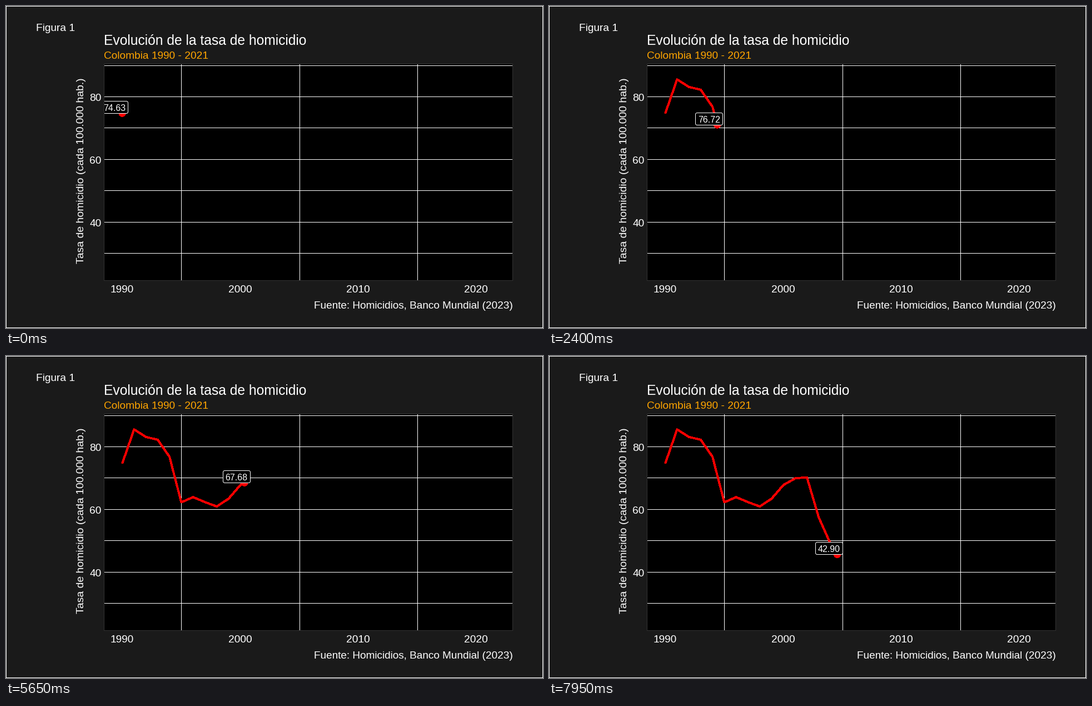
Animation, 966 px wide and 580 px high, one loop 8 s. Source, as a matplotlib script:

```python
import numpy as np
import matplotlib.pyplot as plt
from matplotlib.animation import FuncAnimation
from matplotlib.patches import Circle, FancyBboxPatch, Rectangle

W, H, DPI = 966, 580, 100
FRAMES, STEP_MS = 160, 50
YEARS_PER_FRAME = 0.0916
PT = 72 / DPI  # points per pixel

RATES = np.array([74.63, 85.45, 83.05, 82.16, 76.72, 62.17, 63.83, 62.25,
                  60.85, 63.30, 67.68, 69.82, 70.17, 57.38, 48.90, 42.90])
YEARS = np.arange(len(RATES))  # years since 1990

LEFT, TOP, RIGHT, BOTTOM = 176, 104, 912, 495


def x_px(year):
    return 209.2 + 21.23 * year


def y_px(rate):
    return 106.6 + 5.64 * (90 - rate)


plt.rcParams["font.family"] = "Liberation Sans"
fig = plt.figure(figsize=(W / DPI, H / DPI), dpi=DPI, facecolor="#1a1a1a")
ax = fig.add_axes([0, 0, 1, 1])
ax.set_xlim(0, W)
ax.set_ylim(H, 0)
ax.axis("off")


def fill(x0, y0, x1, y1, color, zorder=1):
    return ax.add_patch(Rectangle((x0, y0), x1 - x0, y1 - y0, fc=color,
                                  ec="none", lw=0, zorder=zorder))


def outline(x0, y0, x1, y1, color, zorder=1):
    """One-pixel border just inside the given box."""
    for side in ((x0, y0, x1, y0 + 1), (x0, y1 - 1, x1, y1),
                 (x0, y0, x0 + 1, y1), (x1 - 1, y0, x1, y1)):
        fill(*side, color, zorder)


def write(x, y, text, size=19.1, color="white", ha="left", **style):
    return ax.text(x, y, text, fontsize=size * PT, color=color, ha=ha,
                   va="baseline", **style)


# Panel, grid and frame
outline(0, 0, W, H, "white")
panel = fill(LEFT, TOP, RIGHT, BOTTOM, "black")
for rate in range(30, 91, 10):
    row = np.round(y_px(rate))
    fill(LEFT, row, RIGHT, row + 1, "white", zorder=2)
for year in (5, 15, 25):
    col = np.round(x_px(year))
    fill(col, TOP, col + 1, BOTTOM, "white", zorder=2)
outline(LEFT, TOP, RIGHT, BOTTOM, "#333333", zorder=9)

# Titles and axis labels
write(54, 45, "Figura 1")
write(176, 70, "Evolución de la tasa de homicidio", size=24.6)
write(176, 95, "Colombia 1990 - 2021", color="#ffa500")
write(911.5, 545, "Fuente: Homicidios, Banco Mundial (2023)", size=19, ha="right")
write(140, 296.5, "Tasa de homicidio (cada 100.000 hab.)", size=19.4, ha="center",
      rotation=90, rotation_mode="anchor")
for rate in (40, 60, 80):
    write(171.5, np.round(y_px(rate)) + 8, str(rate), ha="right")
for year in (0, 10, 20, 30):
    write(x_px(year) - 0.5, 516, str(1990 + year), ha="center")

# Moving parts
line, = ax.plot([], [], color="red", lw=2.85 * PT, zorder=4, antialiased=False,
                solid_capstyle="butt", solid_joinstyle="round")
dot = ax.add_patch(Circle((0, 0), 6, fc="red", ec="none", lw=0, zorder=5,
                          antialiased=False))
tag = ax.add_patch(FancyBboxPatch(
    (0, 0), 49, 22, boxstyle="round,pad=0,rounding_size=2.9",
    fc="black", ec="white", lw=PT, zorder=6, snap=False))
value = write(0, 0, "", size=16, ha="center", zorder=7, clip_on=True)
for part in (line, dot, tag, value):
    part.set_clip_path(panel)


def draw(frame):
    t = frame * YEARS_PER_FRAME
    rate = np.interp(t, YEARS, RATES)
    x, y = x_px(t), y_px(rate)

    past = YEARS <= t
    line.set_data(np.append(x_px(YEARS[past]), x),
                  np.append(y_px(RATES[past]), y))
    dot.center = (x, y)

    right = np.floor(x + 10.42) + 0.5
    top = np.round(y - 22.5) + 0.5
    tag.set_x(right - 49)
    tag.set_y(top)
    value.set_position((right - 24.7, top + 17.5))
    value.set_text(f"{RATES[int(t + 0.5)]:.2f}")
    return line, dot, tag, value


anim = FuncAnimation(fig, draw, frames=FRAMES, interval=STEP_MS,
                     init_func=lambda: draw(0), repeat=True, repeat_delay=0)
plt.show()
```
